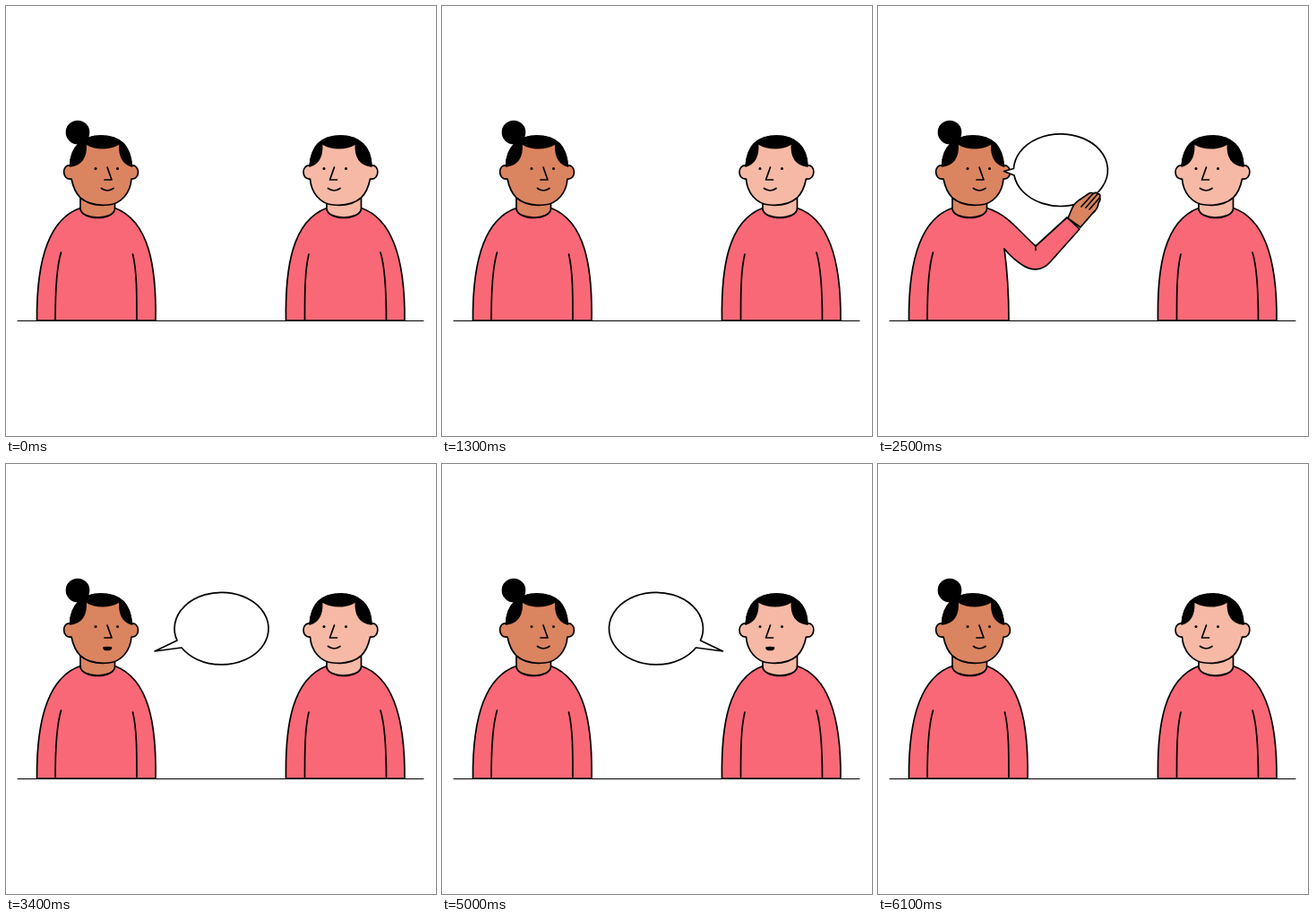
Animation, 480 px wide and 480 px high, one loop 6400 ms. Source, as an HTML page:

```html
<!DOCTYPE html>
<html lang="en">
<head>
<meta charset="utf-8">
<title>Conversation</title>
<style>
  html, body { margin: 0; width: 100%; height: 100%; overflow: hidden; background: #fff; }
  svg { display: block; width: 100%; height: 100%; }
  svg * { stroke-linecap: round; stroke-linejoin: round; }
  .line { fill: none; }
  .ink { fill: #000; }
  .shirt { fill: #f96876; }
  .bubble { fill: #fff; }
</style>
</head>
<body>
<svg id="stage" viewBox="0 0 480 480" stroke="#000" stroke-width="1.7"></svg>
<script>
const stage = document.getElementById('stage');
const path = (cls, d) => `<path class="${cls}" d="${d}"/>`;
const part = (name, content) => `<g data-part="${name}">${content}</g>`;

const leftSide = 'M34.5 351C34 292 44 239 83 225.5C84 240 121 240 121.5 225.5';
const leftArm = path('line', 'M55 351C55 318 56 293 61.5 275');

const armDown = path('shirt', leftSide + 'C160 240 168 292 167 351Z') +
  leftArm + path('line', 'M146 351C146 320 146 296 141.5 277');

const armUp = path('shirt', leftSide +
  'C145 233 155 249 176 268L211 236L225 249L192 286C183 296 171 296 161 289C153 284 146 277 141 271C145 300 146 325 146 351Z') +
  leftArm + path('line', 'M176 268V272.5');

const hand = path('skin', 'M212 237L217 225Q220 219 227 215L235 209.5Q238 207.5 240 209.5Q244 207 245 210Q249 209 247.5 214Q249 216 246 220Q246 226 239 232L226 247Z') +
  path('line', 'M240 209.5L227 224M245 210L232 225M247.5 214L236 227');

const head = path('skin', 'M83 212V226C84 239.500 121 239.500 121.500 226V219Z') +
  path('skin', 'M72 178C62 176 62 195 73 193C75 203 78 209 83 214C92 222 103 223 114 222C129 221 139 208 140 193C150 194 150 177 140 178C139 156 127 145 106 145C84 145 72 158 72 178Z') +
  path('ink', 'M71.500 179C72 157 86 145 106 145C126 145 139 158 140.500 179C131 176 126 167 127 153.500C115 160.500 100 160.500 89 153.500C90 167 85 177 71.500 179Z') +
  path('line', 'M113 180L118 194H110') +
  '<g class="ink" stroke="none"><circle cx="100" cy="181.5" r="1.5"/><circle cx="124.500" cy="181.5" r="1.5"/></g>';

const smile = path('line', 'M106.500 203.500Q113 208.500 120 203.500');
const talk = path('ink', 'M109 205Q113 204 117.500 205Q117 207.500 113 207.500Q109.500 207.500 109 205Z');

const speech = path('bubble', 'M191 197L166 209L196 205A52.500 40.300 0 1 0 191 197Z');
const heard = path('bubble', 'M151.500 181.500L140.500 184.500L152 189A52.500 40.300 0 1 0 151.500 181.500Z');

const people = [
  { skin: '#db8460', flip: '', extra: '<circle class="ink" cx="80" cy="141" r="12.5"/>' },
  { skin: '#f6b9a6', flip: 'translate(479.5 0) scale(-1 1)', extra: '' }
];

const layer = draw => people.map((p, i) =>
  `<g data-side="${i}" fill="${p.skin}" transform="${p.flip}">${draw(p)}</g>`).join('');

stage.innerHTML =
  '<path d="M13 351.500H466" stroke-width="1"/>' +
  layer(p => part('down', armDown) + part('up', armUp) + p.extra + head +
    part('smile', smile) + part('talk', talk)) +
  layer(() => part('speech', speech) + part('heard', heard)) +
  layer(() => part('hand', hand));

const parts = [...stage.querySelectorAll('[data-part]')].map(el => ({
  el, name: el.dataset.part, side: +el.parentNode.dataset.side
}));

function render(now) {
  const turn = 1600;
  const time = now % (2 * turn);
  const speaker = Math.floor(time / turn);
  const t = time % turn;
  const within = (start, end) => t >= start && t < end;
  const talking = within(200, 700);
  const reaching = within(700, 1300);

  for (const { el, name, side } of parts) {
    const speaks = side === speaker;
    const visible = {
      down: speaks || !reaching,
      up: !speaks && reaching,
      hand: !speaks && reaching,
      smile: !speaks || !talking,
      talk: speaks && talking,
      speech: speaks && within(200, 900),
      heard: !speaks && within(900, 1100)
    };
    el.style.display = visible[name] ? '' : 'none';
  }
}

const start = performance.now();
function tick() {
  render(performance.now() - start);
  requestAnimationFrame(tick);
}
tick();
</script>
</body>
</html>
```
